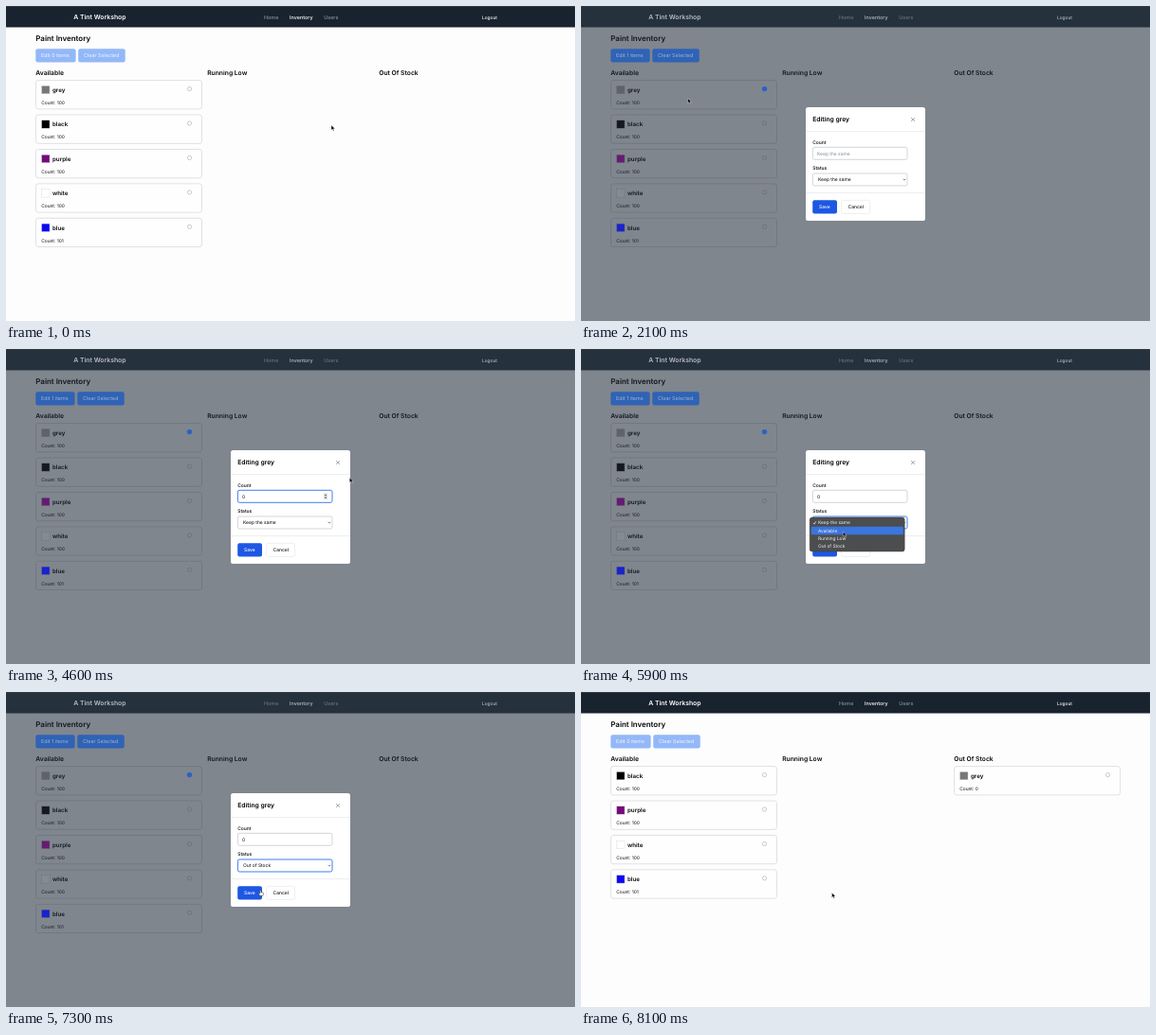
Write an HTML page that moves like this. It is 600x333 px and loops after 8400 ms.

```html
<!DOCTYPE html>
<html lang="en">
<head>
<meta charset="utf-8">
<title>Paint Inventory</title>
<style>
html, body { margin: 0; width: 100%; height: 100%; overflow: hidden; }
svg {
  display: block; width: 600px; height: 333px;
  font-family: Inter, "Liberation Sans", sans-serif;
  text-rendering: geometricPrecision; cursor: default;
  --page: #fdfdfd; --bar: #19232f; --ink: #08090b; --white: #fff; --muted: #89919b;
  --card: #fefefe; --line: #d3d6da; --ring: #a5a9ae;
  --btn: #93b8f8; --btn-ink: #f3f7ff;
  --grey: #777; --black: #000; --purple: #760a7c; --pale: #fff; --blue: #0d08f2;
}
svg.dim {
  --page: #80868e; --bar: #26313e; --ink: #111821; --white: #b7bdc4; --muted: #69737e;
  --card: #80868e; --line: #6c737b; --ring: #646b74;
  --btn: #2f63b6; --btn-ink: #a3b5cf;
  --grey: #5e636a; --black: #151a21; --purple: #661b72; --pale: #858b93; --blue: #1a22cb;
}
.page { fill: var(--page); }
.bar { fill: var(--bar); }
.ink { fill: var(--ink); }
.white { fill: var(--white); }
.muted { fill: var(--muted); }
.btn { fill: var(--btn); }
.btn-ink { fill: var(--btn-ink); }
.card { fill: var(--card); stroke: var(--line); stroke-width: .7; }
.card.hover { fill: #eceeef; }
.ring { fill: none; stroke: var(--ring); stroke-width: .6; }
.ring.on { fill: #2b62c6; stroke: #2b62c6; stroke-width: 1.2; }
.swatch { stroke: var(--line); stroke-width: .4; }
.b { font-weight: 600; }
.m { font-weight: 500; }
.panel { fill: #fff; }
.rule { stroke: #e2e5e9; stroke-width: .7; }
.field { fill: #fff; stroke: #bfc4cb; stroke-width: .7; }
.field.focus { stroke: #3f7fee; stroke-width: 1; }
.hint { fill: #858b95; }
.off { display: none; }
</style>
</head>
<body>
<svg id="stage" viewBox="0 0 600 333">
  <rect class="page" width="600" height="333"/>
  <rect class="bar" width="600" height="22.5"/>
  <rect width="600" height=".9" fill="#363b3d"/>
  <text class="b white" x="71.3" y="14.4" font-size="6.85">A Tint Workshop</text>
  <g class="m" font-size="5.45">
    <text class="muted" x="272" y="14">Home</text>
    <text class="white" x="299" y="14">Inventory</text>
    <text class="muted" x="335.2" y="14">Users</text>
    <text class="white" x="502" y="13.7" font-size="4.8">Logout</text>
  </g>

  <text class="b ink" x="31.3" y="37" font-size="7.95">Paint Inventory</text>
  <g font-size="5.4">
    <rect id="editBox" class="btn" x="31.3" y="45.3" width="42.3" height="14.2" rx="2"/>
    <text id="editText" class="btn-ink" x="37" y="54.4">Edit 0 items</text>
    <g id="clear">
      <rect class="btn" x="76.2" y="45.3" width="49.5" height="14.2" rx="2"/>
      <text class="btn-ink" x="82" y="54.4">Clear Selected</text>
    </g>
  </g>
  <g class="b ink" font-size="6.75">
    <text x="31.3" y="73">Available</text>
    <text x="212.2" y="73">Running Low</text>
    <text x="393.2" y="73">Out Of Stock</text>
  </g>
  <g id="cards"></g>

  <g id="form">
    <rect class="panel" x="237" y="107" width="126" height="120" rx="2.6"/>
    <text class="b" x="244.2" y="122.4" font-size="6.75">Editing grey</text>
    <path d="M348 118l4 4m0-4l-4 4" stroke="#959ba5" stroke-width=".8"/>
    <path class="rule" d="M237 132.6h126M237 197.6h126"/>
    <g class="m" font-size="4.95">
      <text x="244.2" y="145.8">Count</text>
      <text x="244.2" y="173.4">Status</text>
    </g>
    <rect id="count" class="field" x="244.4" y="149.3" width="99.6" height="13" rx="1.8"/>
    <text id="countText" x="249" y="157.6" font-size="4.95"></text>
    <path id="caret" d="M249.2 152.6v6.4" stroke="#111" stroke-width=".6"/>
    <g id="stepper">
      <rect x="334.6" y="152.3" width="4.8" height="7" rx=".6" fill="#e6e6e6"/>
      <path d="M335.8 155l1.2-1.6 1.2 1.6zM335.8 156.6l1.2 1.6 1.2-1.6z" fill="#444"/>
    </g>
    <rect id="status" class="field" x="244.4" y="177" width="99.6" height="13" rx="1.8"/>
    <text id="statusText" x="250" y="185.3" font-size="4.95"></text>
    <path d="M339.7 182.8l1.3 1.4 1.3-1.4" fill="none" stroke="#4b5563" stroke-width=".7"/>
    <rect id="save" x="244.2" y="205.3" width="25.8" height="14.2" rx="2" fill="#1d57e3"/>
    <rect x="274.6" y="205.3" width="30" height="14.2" rx="2" fill="#fff" stroke="#e2e5e9" stroke-width=".6"/>
    <g class="m" font-size="4.95">
      <text x="251" y="214.2" fill="#fff">Save</text>
      <text x="281.6" y="214.2" fill="#15181d">Cancel</text>
    </g>
    <g id="menu" font-size="4.8" fill="#f4f4f4">
      <rect x="241.2" y="178" width="100" height="36" rx="2.6" fill="#4c4d4e" stroke="#3a3b3d" stroke-width=".5"/>
      <rect id="pick" x="242.8" width="97" height="8.4" rx="1.2" fill="#3b75de"/>
      <path d="M245 183.9l1 1.3 1.8-3" fill="none" stroke="#f4f4f4" stroke-width=".7"/>
    </g>
  </g>

  <g id="loading">
    <rect class="panel" x="237" y="135" width="126" height="64.3" rx="2.6"/>
    <text class="b" x="244.2" y="149.5" font-size="6.75">Editing grey</text>
    <path class="rule" d="M237 159.4h126"/>
    <g id="spin" fill="none" stroke-width="1.1">
      <circle cx="300" cy="179.3" r="8.3" stroke="#d4d9e3"/>
      <circle cx="300" cy="179.3" r="8.3" stroke="#3c6fdc" pathLength="100" stroke-dasharray="30 70"/>
    </g>
  </g>

  <g id="pointer">
    <path id="arrow" d="M0 0v5.2l1.3-1.1 .9 2 .9-.4-.9-1.9h1.7z" fill="#000" stroke="#fff" stroke-width=".4"/>
    <path id="hand" d="M-.5.4q.6-.7 1.2 0v2q1.6-.2 2.4.6.3 2-.6 3.2h-2.7q-1.3-1.2-1.9-2.7.5-.7 1.6.3z" fill="#fff" stroke="#222" stroke-width=".5"/>
    <path id="beam" d="M-1.2 0q1.2 0 1.2.8 0-.8 1.2-.8M0 .8v6.4M-1.2 8q1.2 0 1.2-.8 0 .8 1.2.8" fill="none" stroke="#222" stroke-width=".6"/>
  </g>
</svg>
<script>
const LOOP = 8400, PITCH = 36.43;
const $ = id => document.getElementById(id);
const show = (id, on) => $(id).classList.toggle('off', !on);
const mark = (el, name, on) => el.classList.toggle(name, on);

const paints = [['grey', 'grey', 100], ['black', 'black', 100], ['purple', 'purple', 100],
  ['white', 'pale', 100], ['blue', 'blue', 101]];
$('cards').innerHTML = paints.map(([name, tone, count]) => `<g>
  <rect class="card" x="31.5" y="78.6" width="175" height="30.3" rx="2.6"/>
  <rect class="swatch" x="37.6" y="84.4" width="8.4" height="8.4" fill="var(--${tone})"/>
  <text class="b ink" x="49" y="91" font-size="6.2">${name}</text>
  <text class="ink" x="37.2" y="103.8" font-size="4.85">Count: ${count}</text>
  <circle class="ring" cx="193.5" cy="87.6" r="2.1"/></g>`).join('');
const cards = [...$('cards').children];
const grey = cards[0];

const options = ['Keep the same', 'Available', 'Running Low', 'Out of Stock'];
$('menu').insertAdjacentHTML('beforeend',
  options.map((o, i) => `<text x="250" y="${185.4 + i * 8.2}">${o}</text>`).join(''));

// pointer path: time, x, y
const path = [[0, 343, 126], [200, 343, 126], [900, 137.5, 90], [1000, 137.5, 90], [1100, 138, 90.3],
  [1400, 138, 90.3], [1600, 112.8, 98], [2000, 112.8, 98], [2100, 112.6, 97.6], [2300, 112.6, 97.6],
  [2900, 294, 153.5], [3300, 294, 153.5], [3500, 292, 153.5], [4500, 292, 153.5],
  [4600, 362.3, 136], [5300, 277, 187], [5400, 277, 187], [5700, 276.3, 193], [5900, 276.3, 193],
  [6500, 273, 204.4], [6700, 273, 204.4], [6800, 274, 205], [6900, 274, 205],
  [7600, 264.5, 212.2], [LOOP, 264.5, 212.2]];

function pointerAt(t) {
  const i = path.findIndex(k => k[0] > t);
  const [t0, x0, y0] = path[i - 1], [t1, x1, y1] = path[i];
  const u = (t - t0) / (t1 - t0), e = u * u * (3 - 2 * u);
  return [x0 + (x1 - x0) * e, y0 + (y1 - y0) * e];
}

function render(t) {
  const within = (a, b) => t >= a && t < b;
  const dim = within(2100, 8100), done = t >= 8100;
  const [x, y] = pointerAt(t);

  mark($('stage'), 'dim', dim);
  $('editText').textContent = `Edit ${dim ? 1 : 0} items`;
  $('editBox').setAttribute('width', dim ? 41.3 : 42.3);
  $('clear').setAttribute('transform', `translate(${dim ? -1 : 0})`);

  cards.forEach((card, i) => {
    const move = done && !i ? '362 0' : `0 ${(done ? i - 1 : i) * PITCH}`;
    card.setAttribute('transform', `translate(${move})`);
  });
  mark(grey.querySelector('.card'), 'hover', within(1500, 2100));
  mark(grey.querySelector('.ring'), 'on', dim);
  grey.lastElementChild.previousElementSibling.textContent = `Count: ${done ? 0 : 100}`;

  const typed = t >= 4100, focus = within(2900, 5900), open = within(5900, 7000);
  show('form', within(2100, 7800));
  mark($('count'), 'focus', focus);
  mark($('countText'), 'hint', !typed);
  $('countText').textContent = typed ? '0' : options[0];
  show('caret', within(2900, 3400) || within(3900, 4600));
  $('caret').setAttribute('transform', `translate(${typed ? 3.6 : 0})`);
  show('stepper', focus);
  mark($('status'), 'focus', within(5900, 7800));
  $('statusText').textContent = options[t >= 7000 ? 3 : 0];
  show('menu', open);
  const row = Math.max(0, Math.min(3, Math.floor((y - 179.5) / 8.2)));
  $('pick').setAttribute('y', 179.6 + row * 8.2);

  show('loading', within(7800, 8100));
  $('spin').setAttribute('transform', `rotate(${150 + (t - 8000) * .36} 300 179.3)`);

  const overSave = within(7000, 7800) && x < 270;
  const hand = within(900, 2100) || overSave, beam = within(2900, 4100);
  show('hand', hand);
  show('beam', beam);
  show('arrow', !hand && !beam);
  show('pointer', !within(4100, 4600));
  $('pointer').setAttribute('transform', `translate(${x} ${y})`);
}

const start = performance.now();
function tick() {
  const t = (performance.now() - start) % LOOP;
  render(Math.floor(t / 100) * 100);
  requestAnimationFrame(tick);
}
tick();
</script>
</body>
</html>
```
